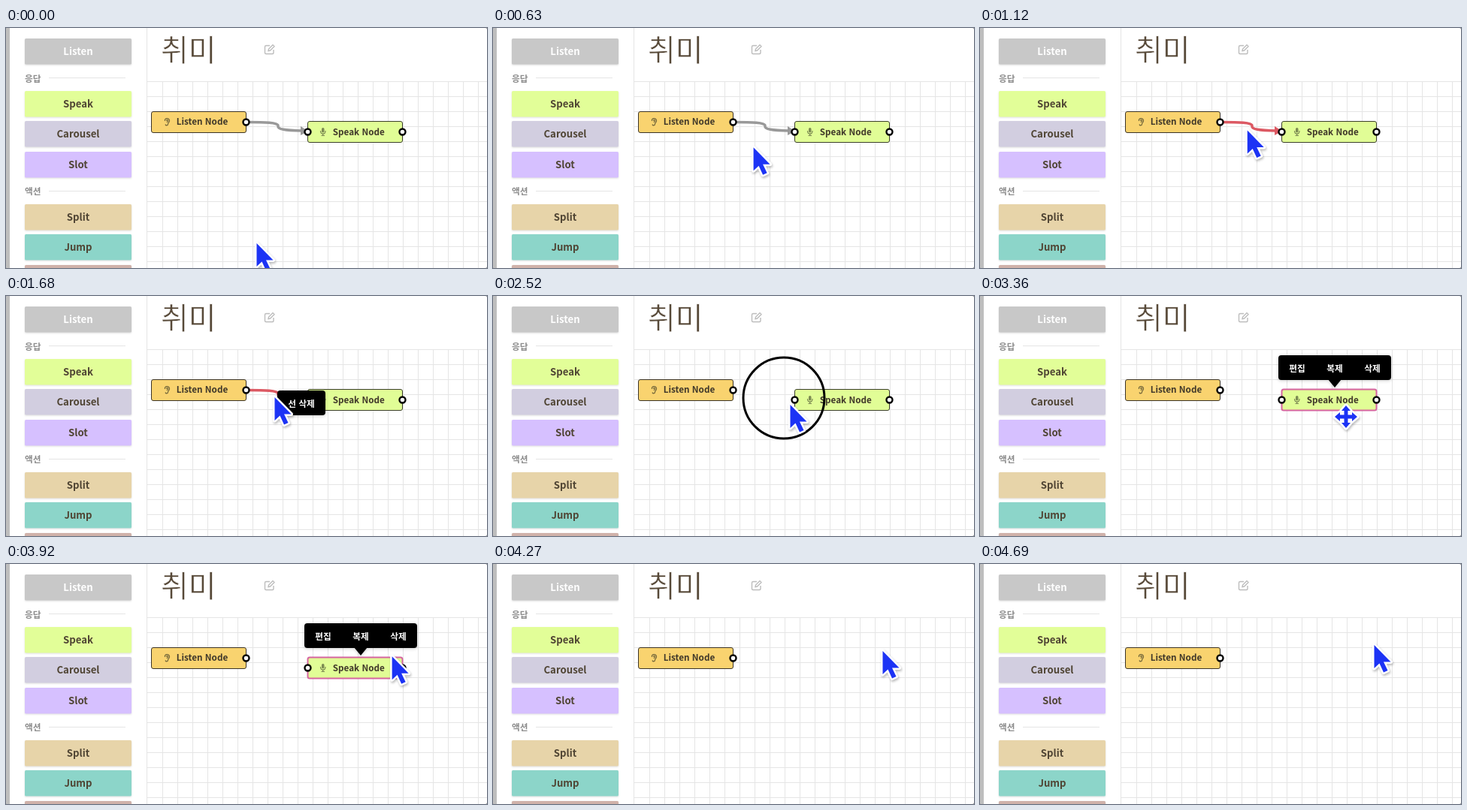
An HTML page for the animation above (4830 ms loop, 640 by 320 pixels).

```html
<!DOCTYPE html>
<html lang="ko">
<head>
<meta charset="utf-8">
<style>
html, body { margin: 0; width: 100%; height: 100%; overflow: hidden; background: #777; }
svg { display: block; width: 640px; height: 320px; background: #fff; border-radius: 2px; font: 700 11.7px "Noto Sans CJK KR", "Noto Sans CJK", "Noto Sans", sans-serif; }
.mid { text-anchor: middle; }
.port { fill: #fff; stroke: #000; stroke-width: 2.4; }
.line { fill: none; stroke: #e5e5e5; }
.icon { fill: none; stroke: #6d6238; stroke-width: 1.2; }
.arrow { fill: #1c33f5; stroke: #fff; stroke-width: 5; stroke-linejoin: round; paint-order: stroke; filter: drop-shadow(1px 2px 1.5px #0004); }
.shade { filter: drop-shadow(0 1px 2px #0003); }
.button { filter: drop-shadow(0 1px 1px #0002); }
</style>
</head>
<body>
<svg viewBox="0 0 640 320">
  <rect width="5" height="320" fill="#bebebe"/>
  <path id="grid" class="line"/>
  <path class="line" d="M187.5 0V320M188 71.5H640M57 66.5H159M57 217.5H159"/>
  <g id="menu"></g>
  <g fill="#8b8b8b" font-size="11.700">
    <text x="25" y="71.500">응답</text>
    <text x="25" y="221.500">액션</text>
  </g>
  <text x="206" y="44" font-size="40" font-weight="300" fill="#574938" stroke="#fff" stroke-width=".6">취미</text>
  <path d="M351 23.500H346Q344.500 23.500 344.500 25V33Q344.500 34.500 346 34.500H354.500Q356 34.500 356 33V29M349 30.500L349.500 28L355 22.500L357 24.500L351.500 30Z" fill="none" stroke="#bdbdbd" stroke-width="1.400"/>

  <g id="edge">
    <path d="M320 125.500C344 125.500 363 126 362 130.500S371 136.500 394 137" fill="none" stroke="currentColor" stroke-width="3.500"/>
    <path d="M392 131L402 137.500L392 143Z" fill="currentColor"/>
  </g>

  <rect x="193.500" y="111.500" width="126" height="28" rx="2.500" fill="#f9d36f" stroke="#3b3426"/>
  <path class="icon" d="M211.500 124C210.500 119.500 217.500 119.500 217.500 123.500C217.500 126 215.500 126 215.500 128C215.500 130.500 212.500 130.500 212 128.500M213.500 124C213.500 122 215.800 122 215.500 124L214 126"/>
  <text x="261" y="129.300" class="mid" fill="#40382a">Listen Node</text>
  <circle class="port" cx="319.500" cy="125.500" r="4"/>

  <g id="speak">
    <rect id="frame" x="401.500" y="124.500" width="126" height="28" rx="2.500" fill="#e1fd96"/>
    <rect x="420" y="133" width="3.500" height="6.500" rx="1.700" fill="#7c8a52"/>
    <path class="icon" style="stroke:#7c8a52" d="M418.500 137C418.500 142.500 425 142.500 425 137M421.700 141V143.500M419.500 143.500H424"/>
    <text x="469.300" y="142.800" class="mid" fill="#40382a">Speak Node</text>
    <circle class="port" cx="401.500" cy="138.500" r="4"/>
    <circle class="port" cx="527.500" cy="138.500" r="4"/>
  </g>

  <g id="tip" class="shade">
    <rect x="361" y="126" width="64" height="33" rx="4"/>
    <text x="393" y="147.500" class="mid" fill="#fff">선 삭제</text>
  </g>
  <g id="popup" class="shade">
    <rect x="397" y="79" width="150" height="33" rx="4"/>
    <path d="M463 111H481L472 122Z"/>
    <g class="mid" fill="#fff">
      <text x="422" y="101">편집</text>
      <text x="472" y="101">복제</text>
      <text x="522" y="101">삭제</text>
    </g>
  </g>

  <circle id="ring" fill="none" stroke="#000" stroke-width="3"/>
  <g id="cursor">
    <path id="pointer" class="arrow" d="M.5 1V32L7.500 25.500L13 37.500L18.500 35L13 23.500H22.500Z"/>
    <path id="mover" class="arrow" d="M0 -15L6 -8H2.500V-2.500H8V-6L15 0L8 6V2.500H2.500V8H6L0 15L-6 8H-2.500V2.500H-8V6L-15 0L-8 -6V-2.500H-2.500V-8H-6Z"/>
  </g>
</svg>
<script>
const LOOP = 4830, STEP = 70, HOT = 8, CELL = 20;
const $ = id => document.getElementById(id);
const show = (id, on) => $(id).style.display = on ? '' : 'none';
const put = (id, attrs) => Object.entries(attrs).forEach(([k, v]) => $(id).setAttribute(k, v));

const buttons = [
  ['Listen', 14, '#c8c8c8'], ['Speak', 84, '#e2fe98'], ['Carousel', 124, '#d2cee0'],
  ['Slot', 165, '#d6c0ff'], ['Split', 235, '#e7d4a9'], ['Jump', 275, '#8cd5c9'], ['', 316, '#d0b2aa']
];
$('menu').innerHTML = buttons.map(([name, y, color], i) =>
  `<rect class="button" x="25" y="${y}" width="142" height="34.500" rx="1.500" fill="${color}"/>
   <text class="mid" x="96" y="${y + 22}" font-size="13.200" fill="${i ? '#4f4433' : '#fff'}">${name}</text>`).join('');

let grid = '';
for (let x = 208.5; x < 640; x += CELL) grid += `M${x} 72V320`;
for (let y = 91.5; y < 320; y += CELL) grid += `M188 ${y}H640`;
put('grid', { d: grid });

// time, x, y of the cursor
const path = [
  [0, 333, 286], [560, 345, 162], [840, 352, 138], [910, 352, 138], [1260, 357, 134],
  [1890, 357, 134], [2380, 395, 144], [2520, 395, 144], [3010, 487, 161], [3500, 487, 161],
  [4060, 518, 115], [4480, 518, 115], [4690, 524, 107], [LOOP, 524, 107]
];
const clicks = [1400, 2520, 3220, 4130];

function cursorAt(t) {
  const i = path.findIndex(k => k[0] > t);
  const [t0, x0, y0] = path[i - 1], [t1, x1, y1] = path[i];
  const u = (t - t0) / (t1 - t0), e = u * u * (3 - 2 * u);
  return [x0 + (x1 - x0) * e, y0 + (y1 - y0) * e];
}

function draw(now) {
  const t = Math.floor(now % LOOP / STEP) * STEP;
  const [menuAt, cutAt, selectAt, removeAt] = clicks;
  const [x, y] = cursorAt(t), hx = x - HOT, hy = y - HOT;
  const selected = t >= selectAt && t < removeAt;
  const over = t < removeAt && hx > 401 && hx < 528 && hy > 124 && hy < 155;

  show('edge', t < cutAt);
  $('edge').style.color = t >= 1120 ? '#dc5963' : '#999';
  show('tip', t >= menuAt && t < cutAt);
  show('popup', selected);
  show('speak', t < removeAt);
  put('frame', { stroke: selected ? '#d665a0' : '#3b3f2a', 'stroke-width': selected ? 2 : 1 });

  const click = clicks.find(c => t >= c && t < c + 2 * STEP);
  show('ring', click !== undefined);
  if (click !== undefined) put('ring', { cx: hx, cy: hy, r: 54 * (1 - (t - click) / (2 * STEP)) });

  put('cursor', { transform: `translate(${x} ${y})` });
  show('mover', over);
  show('pointer', !over);
}

const start = performance.now();
function tick() {
  draw(performance.now() - start);
  requestAnimationFrame(tick);
}
tick();
</script>
</body>
</html>
```
